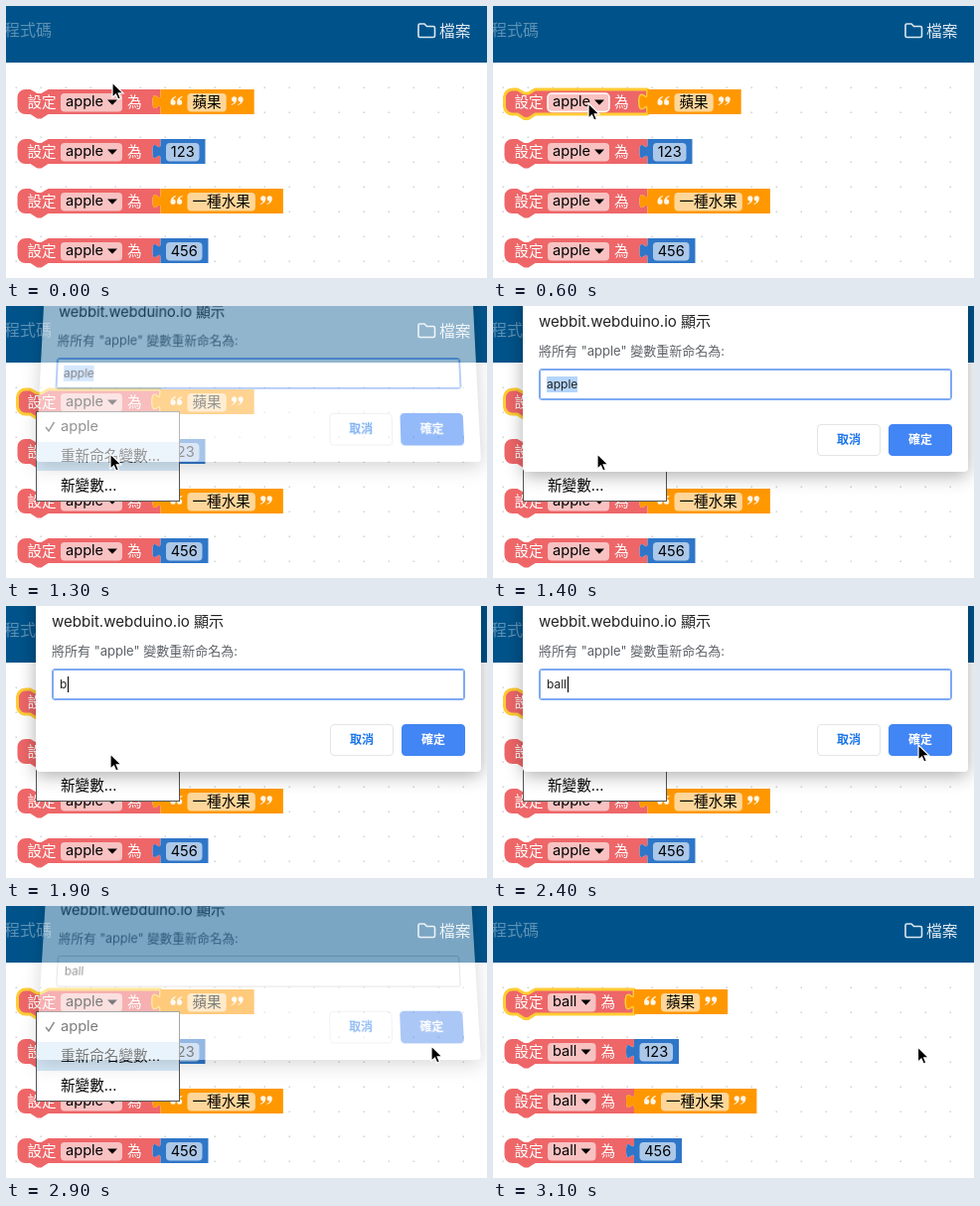
Write an HTML page that moves like this. It is 484x274 px and loops after 5100 ms.

```html
<!DOCTYPE html>
<html lang="zh-Hant">
<head>
<meta charset="utf-8">
<style>
html, body { margin: 0; width: 484px; height: 274px; overflow: hidden; background: #fff; }
body { position: relative; font-family: Inter, "Noto Sans CJK TC", "Noto Sans CJK", sans-serif; }
svg { position: absolute; left: 0; top: 0; font-size: 14.6px; }
#dialog {
  position: absolute; left: 30px; top: -40px; width: 448px; height: 207px;
  background: #fff; border-radius: 4px; box-shadow: 0 4px 18px rgba(0,0,0,.32);
  transform-origin: 50% 100%;
}
#dialog * { position: absolute; box-sizing: border-box; white-space: nowrap; }
#title { left: 16px; top: 46px; font-size: 15.05px; line-height: 20px; color: #222; }
#msg { left: 16px; top: 75px; font-size: 13px; line-height: 20px; color: #5f6368; }
#input { left: 16px; top: 103px; width: 416px; height: 32px; border: 1px solid #c6c8ca; border-radius: 3px; }
#input.focus { border-color: #7ea9f3; box-shadow: inset 0 0 0 1px #7ea9f3; }
#text { left: 7px; top: 7px; font-size: 12px; line-height: 16px; color: #222; }
#text.all { background: #b4d5fe; }
#text.caret { border-right: 1px solid #000; padding-right: 1px; }
.btn { top: 159px; width: 64px; height: 32px; border-radius: 4px; font: 700 12px/30px Inter, "Noto Sans CJK TC", "Noto Sans CJK", sans-serif; text-align: center; border: 1px solid #e2e4e7; color: #1a73e8; }
#cancel { left: 296px; }
#ok { left: 368px; color: #fff; background: #4285f4; border-color: #4285f4; }
#ok.down { background: #508aea; border-color: #508aea; }
</style>
</head>
<body>
<svg id="page" width="484" height="274"></svg>
<div id="dialog">
  <div id="title">webbit.webduino.io 顯示</div>
  <div id="msg">將所有 "apple" 變數重新命名為:</div>
  <div id="input"><span id="text"></span></div>
  <div id="cancel" class="btn">取消</div>
  <div id="ok" class="btn">確定</div>
</div>
<svg width="484" height="274">
  <path id="cursor" d="M0 0V15.2l3.500-3.300 2.200 5.100 2.700-1.100-2.200-5H11z" stroke="#fff" stroke-width="1.2"/>
</svg>
<script>
const $ = id => document.getElementById(id);
const LOOP = 5100, STEP = 100;
const RED = '#ee6668', ORANGE = '#ff9800', BLUE = '#2f76c8';
const TAB = 'c0 10-8-8-8 7.5s8-2.5 8 7.5';
const QUOTE = 'M5.4 0C2 .8 0 3 0 6.2a2.6 2.6 0 1 0 2.7-2.6C3 2.3 3.9 1.4 5.4 .9z';

// Pointer keys: time, x, y
const PATH = [
  [0, 107, 77], [200, 107, 77], [600, 96, 98], [700, 96, 98], [900, 101, 136],
  [1300, 105, 149], [2000, 105, 149], [2400, 428, 140], [2800, 428, 140],
  [3000, 428, 142], [3100, 427.5, 142], [LOOP, 427.5, 142]
];

function pointer(t) {
  const i = PATH.findIndex(k => k[0] > t);
  const [a, b] = [PATH[i - 1], PATH[i]];
  const p = (t - a[0]) / (b[0] - a[0]), e = p * p * (3 - 2 * p);
  return [a[1] + (b[1] - a[1]) * e, a[2] + (b[2] - a[2]) * e];
}

const text = (x, y, s, fill = '#000', more = '') => `<text x="${x}" y="${y}" fill="${fill}" ${more}>${s}</text>`;
const path = (d, fill, more = '') => `<path d="${d}" fill="${fill}" ${more}/>`;
const rect = (x, y, w, h, fill, more = '') => `<rect x="${x}" y="${y}" width="${w}" height="${h}" fill="${fill}" ${more}/>`;
const field = (x, w, more = '') => rect(x, 4, w, 18.5, '#fff', `fill-opacity=".6" rx="4" ${more}`);

function value(x, s, isText) {
  const fx = isText ? 27 : 5.5;
  const fw = isText ? s.length * 14.6 + 10 : s === '123' ? 33.5 : 36.5;
  const end = fx + fw + (isText ? 28 : 6);
  const quotes = [0, 6.5].map(d =>
    path(QUOTE, '#fff', `opacity=".9" transform="translate(${10 + d} 7)"`) +
    path(QUOTE, '#fff', `opacity=".9" transform="translate(${fx + fw + 10.5 + d} 16) rotate(180)"`)).join('');
  return `<g transform="translate(${x})">` +
    path(`M0 0v5${TAB}V25H${end}V0z`, isText ? ORANGE : BLUE) + (isText ? quotes : '') +
    field(fx, fw) + text(fx + fw / 2, 17.6, s, '#000', 'text-anchor="middle"') + '</g>';
}

function block(row, name, s, isText, selected, hover) {
  const w = name === 'apple' ? 62 : 48.5, end = w + 82;
  const body = `M0 8a8 8 0 0 1 8-8h5l7 4h4l7-4H${end}v5${TAB}V25H31l-7 4.5h-4l-7-4.5H8a8 8 0 0 1-8-8z`;
  return `<g transform="translate(11.5 ${84 + row * 50})">` +
    path(body, RED, selected ? 'stroke="#fc3" stroke-width="3" stroke-linejoin="round"' : '') +
    text(10, 17.8, '設定', '#fff') +
    field(43.5, w, hover ? 'stroke="#fff" stroke-width="1.5"' : '') +
    text(48.5, 17.3, name) +
    path(`M${w + 28.5} 10.5h10l-5 5.3z`, '#000') +
    text(w + 48.5, 17.8, '為', '#fff') + value(end, s, isText) + '</g>';
}

function menu(y) {
  const active = y > 136 ? 1 : 0;
  return rect(30.5, 106.5, 144, 90, '#fff', 'stroke="#555"') +
    rect(31, 107 + active * 30, 143, 29, '#d5e8f7') +
    path('M40 122l3 4 5.5-9', 'none', 'stroke="#222" stroke-width="1.5"') +
    ['apple', '重新命名變數...', '新變數...'].map((s, i) => text(55, 126 + i * 30, s)).join('');
}

function page(t, y) {
  const name = t < 3000 ? 'apple' : 'ball';
  const values = ['蘋果', '123', '一種水果', '456'];
  let out = '';
  for (let gy = 82; gy < 274; gy += 25)
    for (let gx = 10; gx < 484; gx += 25) out += rect(gx - .5, gy - .5, 1.5, 1.5, '#d2d2d2');
  out += rect(0, 0, 484, 57, '#00538a') +
    text(-2, 30, '程式碼', '#5c91b5', 'font-size="16"') +
    text(436, 31, '檔案', '#dde8f0', 'font-size="15.8"') +
    path('M415 30V19.5q0-1.5 1.5-1.5h4.5l2.5 2.5h6.5q1.5 0 1.5 1.5v8q0 1.5-1.5 1.5h-13.5q-1.5 0-1.5-1.5z', 'none', 'stroke="#dde8f0" stroke-width="1.6"');
  values.forEach((s, i) => {
    const first = i === 0;
    out += block(i, name, s, i % 2 === 0, first && t >= 600, first && t >= 500 && t < 700);
  });
  return out + (t >= 700 && t < 3000 ? menu(y) : '');
}

function dialog(t) {
  // fold: 0 is fully open, larger values tilt back and fade
  const fold = t === 1300 ? 1 : t === 2800 ? .15 : t === 2900 ? 1.2 : 0;
  const typed = t < 1900 ? 'apple' : 'ball'.slice(0, (t - 1800) / 100);
  const d = $('dialog').style;
  d.display = t >= 1300 && t < 3000 ? 'block' : 'none';
  d.opacity = 1 - .43 * fold;
  d.transform = fold ? `translateY(${-10 * fold}px) perspective(200px) rotateX(${2.6 * fold}deg) scaleY(${1 + .035 * fold})` : 'none';
  $('text').textContent = typed;
  $('text').className = t < 1900 ? 'all' : t < 2500 ? 'caret' : '';
  $('input').className = t < 2500 ? 'focus' : '';
  $('ok').classList.toggle('down', t >= 2500);
}

let last = -1;
const start = performance.now();
function tick() {
  const t = Math.floor((performance.now() - start) % LOOP / STEP) * STEP;
  if (t !== last) {
    last = t;
    const [x, y] = pointer(t);
    $('page').innerHTML = page(t, y);
    dialog(t);
    $('cursor').setAttribute('transform', `translate(${x} ${y})`);
  }
  requestAnimationFrame(tick);
}
tick();
</script>
</body>
</html>
```
